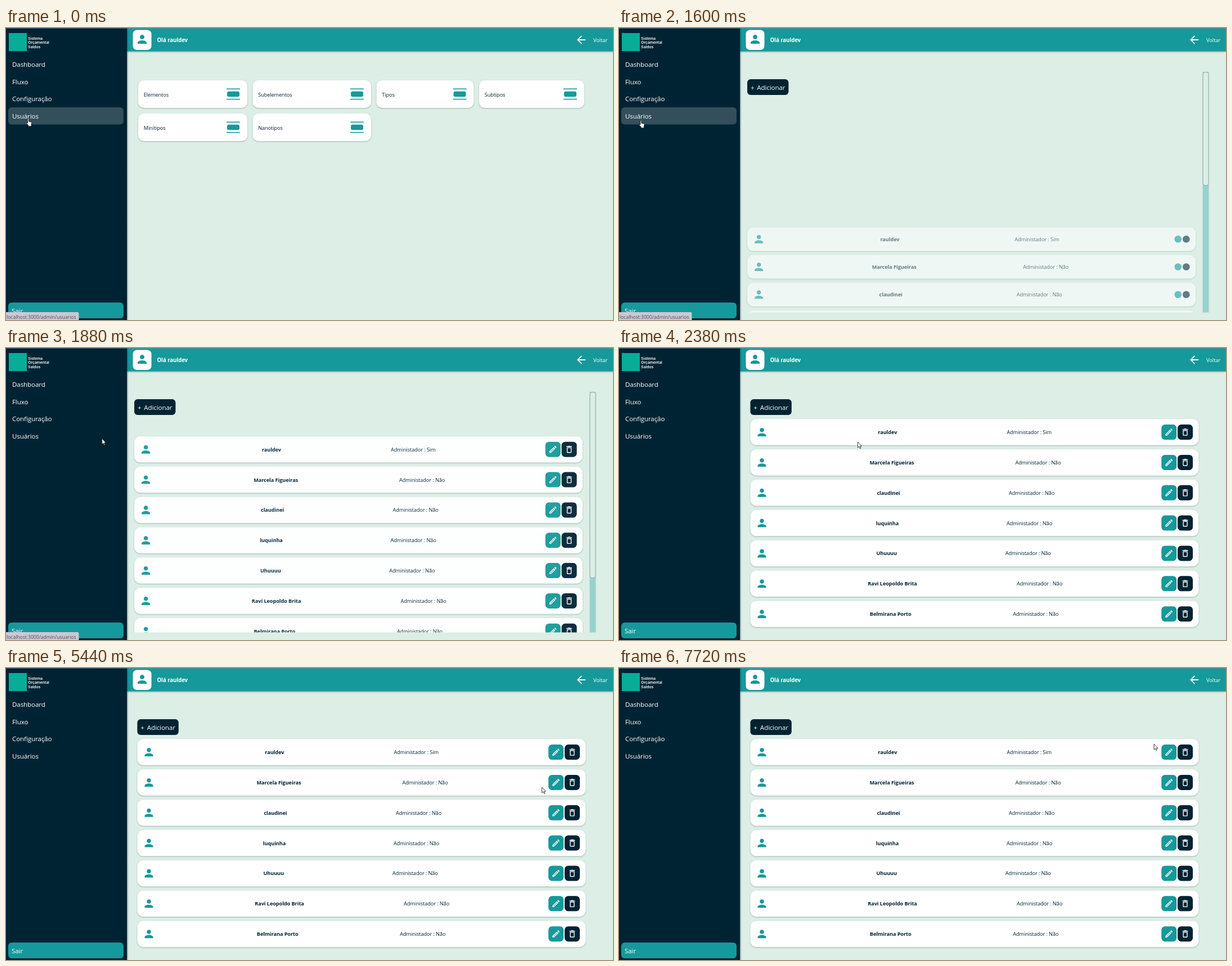
Recreate the animation shown at these times as an HTML page. Size 1079x519 px, loop 8000 ms.

```html
<!DOCTYPE html>
<html lang="pt-BR">
<head>
<meta charset="utf-8">
<title>Usuários</title>
<style>
  html, body { margin: 0; width: 100%; height: 100%; overflow: hidden; background: #dceee6; }
  svg { display: block; width: 1079px; height: 519px; }
  text { font-family: "Open Sans", "Noto Sans", sans-serif; font-size: 9.2px; letter-spacing: -.01em; fill: #002333; }
  .menu { font-size: 11.6px; fill: #fff; }
  .bold { font-weight: 700; }
  .mid { text-anchor: middle; }
  .brand { font: 600 6.7px Inter, sans-serif; fill: #fff; letter-spacing: 0; }
  .card { fill: #fff; filter: drop-shadow(0 1px 1px rgba(0, 35, 51, .28)); }
  .teal { fill: #16999b; }
  .dark { fill: #002333; }
  .white { fill: #fff; }
</style>
</head>
<body>
<svg viewBox="0 0 1079 519">
  <defs>
    <linearGradient id="right"><stop stop-color="#002333" stop-opacity=".4"/><stop offset="1" stop-color="#002333" stop-opacity="0"/></linearGradient>
    <linearGradient id="down" x2="0" y2="1"><stop stop-color="#002333" stop-opacity=".3"/><stop offset="1" stop-color="#002333" stop-opacity="0"/></linearGradient>
    <clipPath id="view"><rect x="216" y="78" width="821" height="427.5"/></clipPath>
    <path id="person" d="M0 0c2.21 0 4-1.79 4-4s-1.79-4-4-4-4 1.79-4 4 1.79 4 4 4zm0 2c-2.67 0-8 1.34-8 4v2h16v-2c0-2.66-5.33-4-8-4z"/>
    <path id="pencil" transform="translate(-12 -12)" d="M14.06 9.02l.92.92L5.92 19H5v-.92l9.06-9.06M17.66 3c-.25 0-.51.1-.7.29l-1.83 1.83 3.75 3.75 1.83-1.83c.39-.39.39-1.02 0-1.41l-2.34-2.34c-.2-.2-.45-.29-.71-.29zm-3.6 3.19L3 17.25V21h3.75L17.81 9.94l-3.75-3.75z"/>
    <path id="trash" transform="translate(-12 -12)" d="M16 9v10H8V9h8m-1.5-6h-5l-1 1H5v2h14V4h-3.5l-1-1zM18 7H6v12c0 1.1.9 2 2 2h8c1.1 0 2-.9 2-2V7z"/>
  </defs>

  <rect width="1079" height="519" fill="#dceee6"/>
  <g id="cards"></g>
  <g id="list">
    <g id="add">
      <rect class="dark" x="233.4" y="91" width="73.4" height="28" rx="6"/>
      <text class="menu" x="239.3" y="110">+</text>
      <text class="menu" x="250.7" y="110">Adicionar</text>
    </g>
    <g clip-path="url(#view)"><g id="rows"></g></g>
    <g id="bar">
      <rect x="1037.5" y="78" width="11" height="427.5" fill="#97d2cc"/>
      <rect id="thumb" x="1038" y="78.5" width="10" rx="4" fill="#dceee6" stroke="#8fa9a6"/>
    </g>
  </g>

  <rect class="teal" x="215" width="864" height="41.5"/>
  <rect x="215" y="41.5" width="864" height="3" fill="url(#down)"/>
  <rect class="white" x="225.5" y="3.5" width="33" height="35.5" rx="7"/>
  <use href="#person" class="teal" x="242" y="20"/>
  <text class="bold white" x="268.5" y="25" style="font-size:9.7px;fill:#fff">Olá rauldev</text>
  <path class="white" transform="translate(1011.2 9.6) scale(.95)" d="M20 11H7.83l5.59-5.59L12 4l-8 8 8 8 1.41-1.41L7.83 13H20v-2z"/>
  <text x="1044" y="25" style="font-size:9.4px;fill:#fff">Voltar</text>

  <rect class="dark" width="215" height="519"/>
  <rect x="215" y="0" width="3" height="519" fill="url(#right)"/>
  <rect width="1079" height="1" fill="#7d9196" opacity=".6"/>
  <rect x="5" y="9" width="32" height="32" fill="#08ad98"/>
  <text class="brand" x="39.3" y="20.6">Sistema</text>
  <text class="brand" x="39.3" y="28.3">Orçamental</text>
  <text class="brand" x="39.3" y="36">Saldos</text>
  <rect id="hover" x="4" y="141" width="205" height="30.5" rx="6" fill="#fff"/>
  <text class="menu" x="11" y="69">Dashboard</text>
  <text class="menu" x="11" y="99.7">Fluxo</text>
  <text class="menu" x="11" y="130.4">Configuração</text>
  <text class="menu" x="11" y="161">Usuários</text>
  <rect class="teal" x="4" y="488" width="205" height="28" rx="6"/>
  <text class="menu" x="10" y="507">Sair</text>
  <g id="status">
    <path d="M0 505h127q2.500 0 2.500 2.500V519H0z" fill="#cbc8d4"/>
    <text x="1" y="516.500" style="font-size:8.550px;letter-spacing:0;fill:#4a4c58">localhost:3000/admin/usuarios</text>
  </g>

  <g id="cursor" fill="#fff" stroke="#111" stroke-width=".8" stroke-linejoin="round">
    <path id="arrow" d="M0 0v10.200l2.300-2.100 1.700 3.500 1.500-.7-1.600-3.400h3.100z"/>
    <path id="hand" transform="translate(-3.600 0)" d="M2.600 8.200V1.200a1 1 0 0 1 2 0v4l4.200.9q1 .3.900 1.400l-.7 4v2.200h-5.200v-2L.6 8.800q-.4-1.300.8-1.400z"/>
  </g>
</svg>
<script>
const LOOP = 8000, OPEN = 1380, SETTLED = 2043;
const $ = id => document.getElementById(id);
const clamp = v => Math.max(0, Math.min(1, v));
const ramp = (t, a, b) => clamp((t - a) / (b - a));
const mix = (a, b, p) => a + (b - a) * p;
const show = (id, on) => $(id).setAttribute('display', on ? 'inline' : 'none');
const move = (el, x, y, s = 1) => el.setAttribute('transform', `translate(${x} ${y}) scale(${s})`);

const cards = [
  ['Elementos', 235, 93, 194], ['Subelementos', 438.5, 93, 210.5],
  ['Tipos', 658.5, 93, 173], ['Subtipos', 841, 93, 187],
  ['Minitipos', 235, 152, 194], ['Nanotipos', 438.5, 152, 210.5]
];
$('cards').innerHTML = cards.map(([name, x, y, w]) => `
  <rect class="card" x="${x}" y="${y}" width="${w}" height="49" rx="10"/>
  <text x="${x + 9.7}" y="${y + 28.5}">${name}</text>
  <g class="teal" transform="translate(${x + w - 25} ${y + 24.5})">
    <rect x="-12" y="-10" width="24" height="1.6"/>
    <rect x="-11" y="-4.7" width="22" height="9.4" rx="3"/>
    <rect x="-12" y="8.300" width="24" height="1.6"/>
  </g>`).join('');

// name, centre of the name, start of the role
const users = [
  ['rauldev', 477.3, 689.5], ['Marcela Figueiras', 485, 704.5],
  ['claudinei', 479, 693], ['luquinha', 477, 689], ['Uhuuuu', 475.7, 686.7],
  ['Ravi Leopoldo Brita', 486, 707], ['Belmirana Porto', 482.7, 700.3]
];
$('rows').innerHTML = users.map(([name], i) => `
  <g class="row">
    <rect class="card" x="233.400" width="797" rx="11"/>
    <g class="icon teal"><use href="#person"/></g>
    <text class="name bold mid">${name}</text>
    <text class="role">Administador : ${i ? 'Não' : 'Sim'}</text>
    <g class="edit"><rect class="teal"/><g class="white"><use href="#pencil"/></g></g>
    <g class="del"><rect class="dark"/><g class="white"><use href="#trash"/></g></g>
  </g>`).join('');
const rows = [...document.querySelectorAll('.row')].map(row => {
  const part = name => row.querySelector('.' + name);
  return { row, box: part('card'), icon: part('icon'), name: part('name'),
    role: part('role'), edit: part('edit'), del: part('del') };
});

const FULL = 27, EMPTY = 12.7;
function setButton(el, x, y, size) {
  move(el, x, y);
  const box = el.firstElementChild, grow = (size - EMPTY) / (FULL - EMPTY);
  const attrs = { x: -size / 2, y: -size / 2, width: size, height: size, rx: 6.4 };
  for (const key in attrs) box.setAttribute(key, attrs[key]);
  move(el.lastElementChild, 0, 0, .7 * grow);
}

function drawList(t) {
  const left = ramp(SETTLED - t, 0, SETTLED - OPEN) ** 2;
  const drop = 513 * left, scrolling = t < SETTLED;
  const size = mix(EMPTY, FULL, ramp(t, 1640, 1840));
  const lost = 2 * (FULL - size);
  const height = 19.5 + Math.max(22.4, size);
  const shift = scrolling ? -5.4 : 0;
  move($('add'), shift, 0);
  move($('rows'), shift, drop);
  $('rows').setAttribute('opacity', 1 - left);
  show('bar', scrolling);
  $('thumb').setAttribute('height', Math.max(14, 350 - .652 * drop));
  rows.forEach((r, i) => {
    const mid = height / 2;
    move(r.row, 0, 126.3 + i * (height + 7.35));
    r.box.setAttribute('height', height);
    move(r.icon, 254, mid, .94);
    move(r.name, users[i][1] + lost / 3, mid + 3.5);
    move(r.role, users[i][2] + lost * 2 / 3, mid + 3.5);
    setButton(r.del, 1020 - size / 2, mid, size);
    setButton(r.edit, 1018.2 - size * 1.5, mid, size);
  });
  const over = ramp(t, 5700, 5950) - ramp(t, 7340, 7600);
  rows[0].edit.setAttribute('opacity', 1 - .15 * over);
}

// time, x, y of the pointer tip
const path = [
  [0, 39.5, 161], [1180, 39.5, 161], [1380, 38.5, 164], [1600, 38.5, 164],
  [1880, 170, 161], [2140, 338, 169], [2380, 424.5, 167], [2700, 428, 171],
  [2940, 428, 171], [3350, 446, 136], [3720, 469, 102], [4090, 469, 102],
  [4290, 408, 250], [4500, 382, 500], [4680, 510, 450], [4840, 627, 386],
  [4900, 630, 384], [5200, 912, 262], [5440, 952.5, 212], [5690, 984, 142],
  [5750, 984, 142], [6220, 982.5, 145], [6560, 982.5, 145], [6800, 983, 144.5],
  [7300, 983, 144.5], [7720, 951, 135], [LOOP, 951, 135]
];
function pointer(t) {
  const i = path.findIndex(p => p[0] > t);
  const a = path[i - 1], b = path[i], p = ramp(t, a[0], b[0]);
  return [mix(a[1], b[1], p), mix(a[2], b[2], p)];
}

function draw(t) {
  const open = t >= OPEN;
  show('cards', !open);
  show('list', open);
  if (open) drawList(t);
  $('hover').setAttribute('opacity', .2 * (1 - ramp(t, 1680, 1830)));
  show('status', t < 2100);
  const [x, y] = pointer(t);
  const link = t < 1700 || (x > 964 && y < 163 && t > 5600);
  move($('cursor'), x, y);
  show('hand', link);
  show('arrow', !link);
}

const start = performance.now();
function tick() {
  draw((performance.now() - start) % LOOP);
  requestAnimationFrame(tick);
}
tick();
</script>
</body>
</html>
```
